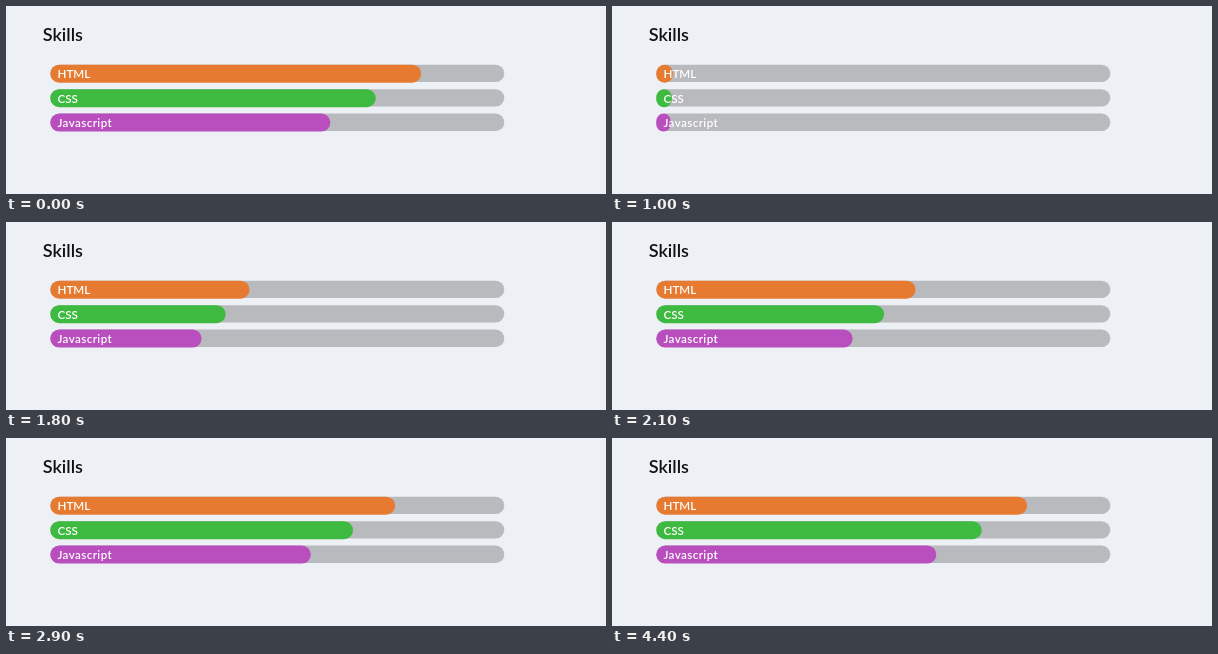
These frames come from a looping animation (600 px wide and 188 px high, 5.8 s). An HTML page:

```html
<!DOCTYPE html>
<html lang="en">
<head>
<meta charset="utf-8">
<title>Skills</title>
<style>
  html, body { margin: 0; width: 100%; height: 100%; overflow: hidden; background: #edf0f5; }
  svg { display: block; width: 100%; height: 100%; }
  text { font-family: Lato, "Open Sans", sans-serif; font-weight: 600; }
  .title { font-size: 18px; fill: #111; }
  .label { font-size: 11.6px; fill: #fff; }
</style>
</head>
<body>
<svg id="stage" viewBox="0 0 600 188">
  <text class="title" x="36.8" y="34.8">Skills</text>
</svg>
<script>
const LOOP = 5800, RESET = 400, FIRST = 1000, START = 878, GROW = 3000, STEP = 100;
const LEFT = 44.3, TRACK = 454, PAD = 7.6, TALL = 18;
const stage = document.getElementById('stage');

function add(tag, attrs, text = '') {
  const el = document.createElementNS('http://www.w3.org/2000/svg', tag);
  for (const key in attrs) el.setAttribute(key, attrs[key]);
  el.textContent = text;
  return stage.appendChild(el);
}

const bars = [
  { name: 'HTML', share: 0.8, color: '#e77a31', spacing: 0 },
  { name: 'CSS', share: 0.7, color: '#3fba41', spacing: 0 },
  { name: 'Javascript', share: 0.6, color: '#b94fbe', spacing: 0.4 }
].map(({ name, share, color, spacing }, i) => {
  const y = 58.7 + i * 24.45;
  add('rect', { x: LEFT, y, width: TRACK, height: 17.4, rx: 8.7, fill: '#b9babd' });
  const fill = add('rect', { x: LEFT, y, height: TALL, fill: color });
  add('text', { class: 'label', x: LEFT + 7.2, y: y + 13.4, 'letter-spacing': spacing }, name);
  return { fill, share };
});

// CSS "ease": cubic-bezier(.25, .1, .25, 1)
function ease(p) {
  if (p <= 0) return 0;
  if (p >= 1) return 1;
  let lo = 0, hi = 1;
  for (let i = 0; i < 24; i++) {
    const s = (lo + hi) / 2;
    if (0.75 * s * (1 - s) + s ** 3 < p) lo = s; else hi = s;
  }
  return 0.3 * lo * (1 - lo) ** 2 + 3 * lo * lo * (1 - lo) + lo ** 3;
}

function progress(t) {
  if (t < RESET) return 1;
  if (t < FIRST) return 0;
  return ease((Math.floor(t / STEP) * STEP - START) / GROW);
}

function draw(t) {
  const grown = progress(t);
  for (const { fill, share } of bars) {
    const width = PAD + TRACK * share * grown;
    fill.setAttribute('width', width);
    fill.setAttribute('rx', Math.min(TALL, width) / 2);
    fill.setAttribute('ry', Math.min(TALL, width) / 2);
  }
}

const begin = performance.now();
function tick() {
  draw((performance.now() - begin) % LOOP);
  requestAnimationFrame(tick);
}
tick();
</script>
</body>
</html>
```
